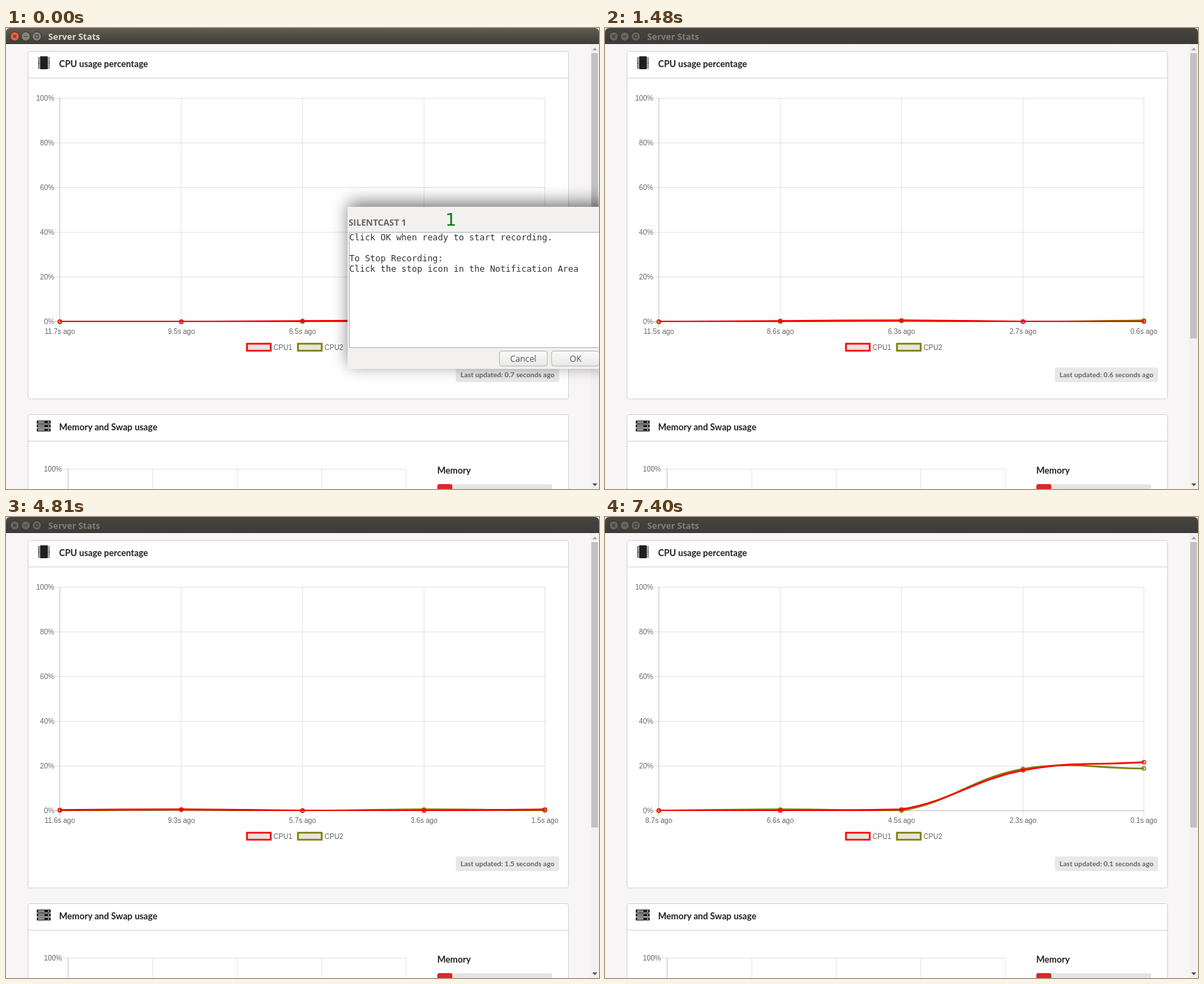
Write an HTML page that moves like this. It is 849 by 660 pixels and loops after 8 s.

```html
<!DOCTYPE html>
<html lang="en">
<head>
<meta charset="utf-8">
<title>Server Stats</title>
<style>
html, body { margin: 0; width: 100%; height: 100%; overflow: hidden; background: #fff; }
svg { display: block; }
.head { font: bold 12.7px Lato, sans-serif; fill: #1f1f1f; }
.tick { font: 10.1px "Liberation Sans", Arial, sans-serif; fill: #666; }
.badge { font: bold 10.1px Lato, sans-serif; fill: #666; }
.bar { font: bold 12.4px "Open Sans", sans-serif; }
.btn { font: 12.2px "Open Sans", sans-serif; fill: #5c5c5c; }
.mono { font: 12.4px "DejaVu Sans Mono", monospace; fill: #333; white-space: pre; }
.mid { text-anchor: middle; }
.end { text-anchor: end; }
.card { fill: #fff; stroke: #d4d4d5; }
.grid { stroke: #000; stroke-opacity: .1; fill: none; }
.axis { stroke: #000; stroke-opacity: .25; fill: none; }
</style>
</head>
<body>
<svg id="stage" width="849" height="660" viewBox="0 0 849 660">
  <defs>
    <linearGradient id="active" x2="0" y2="1"><stop stop-color="#5f5d53"/><stop offset="1" stop-color="#3d3c37"/></linearGradient>
    <linearGradient id="idle" x2="0" y2="1"><stop stop-color="#454440"/><stop offset="1" stop-color="#3c3b37"/></linearGradient>
    <linearGradient id="button" x2="0" y2="1"><stop stop-color="#fafafa"/><stop offset="1" stop-color="#e9e8e7"/></linearGradient>
    <filter id="blur" x="-20%" y="-30%" width="140%" height="160%"><feGaussianBlur stdDeviation="12"/></filter>
    <clipPath id="plot"><path d="M77 100H772V421H77z"/></clipPath>
  </defs>
  <rect y="18" width="849" height="642" fill="#f7f5f5"/>
  <g id="title"></g>

  <rect x="836.5" y="23" width="12.5" height="637" fill="#f2f1f1"/>
  <rect x="838" y="36" width="9.5" height="408.5" fill="#c1c1c1"/>
  <path d="M839.5 32h7l-3.5-4z" fill="#a3a3a3"/>
  <path d="M839.5 652h7l-3.5 4z" fill="#505050"/>

  <rect class="card" x="31.5" y="33.5" width="774" height="497.5" rx="3"/>
  <path d="M31 71.5H805" stroke="#d4d4d5"/>
  <rect class="card" x="31.5" y="553.5" width="774" height="130" rx="3"/>
  <path d="M31 591.5H805" stroke="#d4d4d5"/>
  <g fill="#1f1f1f">
    <rect x="48.7" y="40.5" width="11.2" height="18.5" rx="1"/>
    <path d="M47 42.2v16M61.6 42.2v16" stroke="#1f1f1f" stroke-width="2" stroke-dasharray="1.6 1.2"/>
  </g>
  <g id="rack"></g>
  <text class="head" x="76" y="55.5">CPU usage percentage</text>
  <text class="head" x="76" y="575.5">Memory and Swap usage</text>
  <text class="head" x="617.5" y="637.5">Memory</text>
  <rect x="617.5" y="653" width="164.5" height="18" rx="3" fill="#e5e5e5"/>
  <rect x="617.5" y="653" width="21.5" height="18" rx="3" fill="#d8282b"/>

  <g id="grids"></g>
  <g id="series"></g>
  <g id="legend"></g>
  <g id="ages"></g>
  <rect x="644" y="486" width="148" height="21" rx="3" fill="#e8e8e8"/>
  <text id="updated" class="badge mid" x="718" y="500"></text>

  <g id="dialog">
    <rect x="491" y="250" width="400" height="232" opacity=".55" filter="url(#blur)"/>
    <rect x="489" y="256" width="370" height="232" fill="#f2f1f0"/>
    <text class="bar" x="490.5" y="283" fill="#666">SILENTCAST 1</text>
    <text x="629" y="283" fill="#118011" style="font:25px 'DejaVu Sans',sans-serif">1</text>
    <rect x="491.5" y="292.5" width="370" height="165" fill="#fff" stroke="#b8b6b3"/>
    <text class="mono" x="491.5" y="304">Click OK when ready to start recording.</text>
    <text class="mono" x="491.5" y="334">To Stop Recording:</text>
    <text class="mono" x="491.5" y="349">Click the stop icon in the Notification Area</text>
    <g fill="url(#button)" stroke="#b8b5b1">
      <rect x="706.5" y="462.5" width="68.5" height="21.5" rx="3.5"/>
      <rect x="781" y="462.5" width="68.5" height="21.5" rx="3.5"/>
    </g>
    <text class="btn mid" x="740.5" y="477.5">Cancel</text>
    <text class="btn mid" x="815.5" y="477.5">OK</text>
  </g>
</svg>
<script>
const $ = id => document.getElementById(id);
const XS = [77, 251, 424.5, 598.5, 771.5];
const TOP = 100.5, BASE = 420.5;
const LOOP = 8000;

// Load samples in percent; the chart shows five at a time.
const CPU1 = [0, 0, .3, .6, .1, .1, .6, 18.1, 21.7];
const CPU2 = [0, 0, .1, .4, 0, .6, .1, 18.7, 18.9];
const SHIFTS = [0, 1110, 2960, 5180, 7400];

// Sample ages: when they are refreshed, and when they grow by one second.
const AGES = [
  { at: 0, tick: 740, ages: [11.7, 9.5, 6.5, 4.3, .7] },
  { at: 1480, tick: 2590, ages: [11.5, 8.6, 6.3, 2.7, .6] },
  { at: 3700, tick: 4810, ages: [10.6, 8.3, 4.7, 2.6, .5] },
  { at: 5550, tick: 6660, ages: [10.3, 6.7, 4.6, 2.5, .3] },
  { at: 7400, tick: LOOP, ages: [8.7, 6.6, 4.5, 2.3, .1] }
];

const label = (x, y, cls, text) => `<text class="tick ${cls}" x="${x}" y="${y}">${text}</text>`;
const line = (cls, d) => `<path class="${cls}" d="${d}"/>`;

function titleBar(focused) {
  const ink = focused ? '#45443e' : '#3c3b37';
  const knob = focused ? '#858379' : '#66645d';
  const signs = ['M-2-2 2 2M2-2-2 2', 'M-2.7 0H2.7', 'M-2.2-2.2H2.2V2.2H-2.2z'];
  return `<path d="M0 23V6Q0 0 6 0H843Q849 0 849 6V23z" fill="url(#${focused ? 'active' : 'idle'})"/>` +
    signs.map((d, i) => `<g transform="translate(${12.5 + i * 15.8} 12)" stroke="${ink}">
      <circle r="6.5" fill="${focused && !i ? '#e8613c' : knob}" stroke="#33322e"/>
      <path d="${d}" fill="none" stroke-width="1.2"/></g>`).join('') +
    `<text class="bar" x="60.5" y="16.5" fill="${focused ? '#dfdbd2' : '#827f77'}">Server Stats</text>`;
}

function grids() {
  let out = '';
  for (let i = 0; i < 6; i++) {
    const y = TOP + i * 64;
    out += line(i < 5 ? 'grid' : 'axis', `M69 ${y}H772`) + label(69, y + 3.5, 'end', 100 - i * 20 + '%');
  }
  XS.forEach((x, i) => out += line(i ? 'grid' : 'axis', `M${x} 100V428.5`));
  out += line('grid', 'M81 631.5H573') + label(80, 635, 'end', '100%');
  for (let i = 0; i < 5; i++) out += line(i ? 'grid' : 'axis', `M${89 + i * 121} 631V660`);
  return out;
}

// Smooth path whose control points stay inside the plot.
function curve(pts) {
  const cap = y => Math.min(BASE, Math.max(TOP, y));
  const ctrl = pts.map((p, i) => {
    const a = pts[i - 1] || p, b = pts[i + 1] || p;
    const before = Math.hypot(p[0] - a[0], p[1] - a[1]);
    const after = Math.hypot(b[0] - p[0], b[1] - p[1]);
    const k = .4 / (before + after);
    const at = f => [p[0] + f * (b[0] - a[0]), cap(p[1] + f * (b[1] - a[1]))];
    return { into: at(-k * before), out: at(k * after) };
  });
  return 'M' + pts[0] + pts.slice(1).map((p, i) => `C${ctrl[i].out} ${ctrl[i + 1].into} ${p}`).join('');
}

function series(values, start, color) {
  const pts = XS.map((x, i) => [x, BASE - values[start + i] * 3.2]);
  return `<path d="${curve(pts)}" fill="none" stroke="${color}" stroke-width="2.5" clip-path="url(#plot)"/>` +
    pts.map(([x, y]) => `<circle cx="${x}" cy="${y}" r="2.6" fill="#0001" stroke="${color}" stroke-width="1.2"/>`).join('');
}

$('grids').innerHTML = grids();
$('rack').innerHTML = [562, 567.6, 573.2].map(y =>
  `<rect x="44" y="${y}" width="20" height="4.4" rx=".6" fill="#1f1f1f"/>
   <path d="M46 ${y + 2.2}h9M60 ${y + 2.2}h2" stroke="#fff" stroke-width="1.2"/>`).join('');
$('legend').innerHTML = [['CPU1', 345, 'red'], ['CPU2', 418, 'olive']].map(([name, x, color]) =>
  `<rect x="${x}" y="452" width="34" height="10" fill="#e5e5e5" stroke="${color}" stroke-width="2.5"/>` +
  label(x + 38, 461, '', name)).join('');

let shown = '';
function draw() {
  const t = performance.now() % LOOP;
  const start = SHIFTS.filter(s => s <= t).length - 1;
  const step = AGES.filter(a => a.at <= t).pop();
  const ages = step.ages.map(a => (a + (t >= step.tick ? 1 : 0)).toFixed(1));
  const key = [start, ages, t < 370, t < 740].join();
  if (key !== shown) {
    shown = key;
    $('title').innerHTML = titleBar(t < 740);
    $('dialog').style.display = t < 370 ? '' : 'none';
    $('series').innerHTML = series(CPU2, start, 'olive') + series(CPU1, start, 'red');
    $('ages').innerHTML = ages.map((a, i) => label(XS[i], 438, 'mid', a + 's ago')).join('');
    $('updated').textContent = `Last updated: ${ages[4]} seconds ago`;
  }
  requestAnimationFrame(draw);
}
draw();
</script>
</body>
</html>
```
